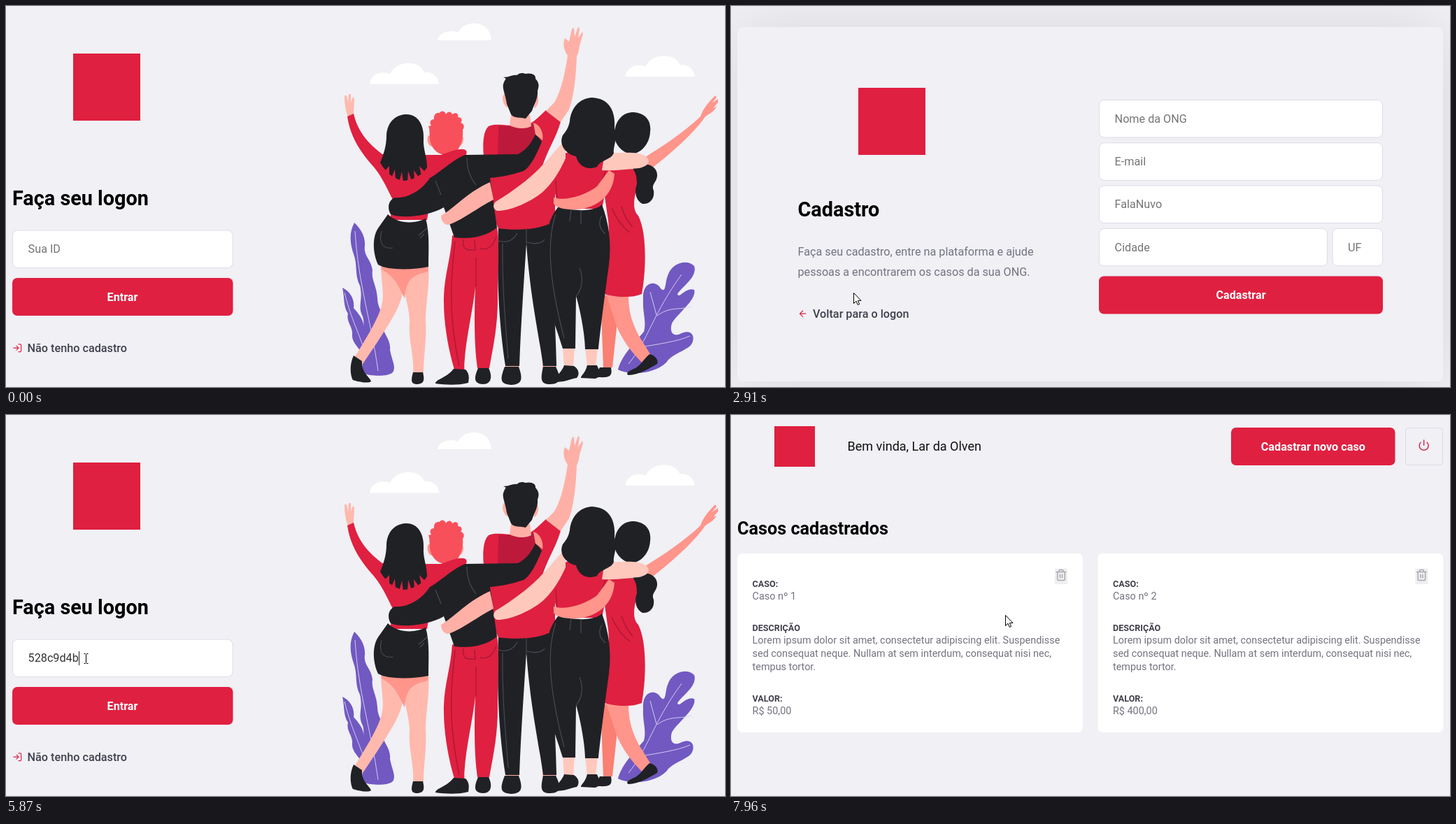
An HTML page for the animation above (8 s loop, 1028x545 px).

```html
<!DOCTYPE html>
<html lang="pt-BR">
<head>
<meta charset="utf-8">
<title>Logon</title>
<style>
html, body { margin: 0; width: 100%; height: 100%; overflow: hidden; background: #f0f0f5; }
svg { display: block; width: 100vw; height: 100vh; }
text { font: 400 16.2px Roboto, sans-serif; fill: #737380; }
.title { font-weight: 700; font-size: 28.8px; fill: #000; }
.link { font-weight: 500; fill: #41414d; }
.label { font-weight: 700; fill: #fff; text-anchor: middle; }
.hint { fill: #757575; }
.small { font-size: 14.4px; }
.tag { font-size: 12.6px; font-weight: 700; fill: #41414d; }
.box { fill: #fff; stroke: #dcdce6; }
.icon { fill: none; stroke: #e02041; stroke-width: 2; stroke-linecap: round; stroke-linejoin: round; }
.r { fill: #df2040; } .k { fill: #202125; } .s { fill: #ffb9ad; } .p { fill: #ff958b; }
.t { fill: #ffb0a6; } .l { fill: #ffc8bd; } .v { fill: #7159c1; } .w { fill: #fff; } .d { fill: #bd193b; }
.line { fill: none; stroke: #a81738; stroke-width: 1.3; }
.seam { fill: none; stroke: #4c4d54; stroke-width: 1.1; }
.vein { fill: none; stroke: #ded6f5; stroke-width: .9; }
.cursor path { fill: #fff; stroke: #000; stroke-linejoin: round; }
</style>
</head>
<body>
<svg viewBox="0 0 1028 545" preserveAspectRatio="none">
<defs>
  <path id="cloud" d="M520 111.500C521 98 536 92 549 97C558 77 592 77 598 95C610 93 619 102 619 111.500Z"/>
  <g id="case">
    <rect x="9" y="198" width="494" height="256" rx="7" fill="#fff"/>
    <rect x="463" y="219.5" width="18" height="22.5" fill="#efefef"/>
    <g class="icon" style="stroke:#a8a8b3" transform="translate(463 220) scale(.75)">
      <path d="M3 6H21M19 6v14a2 2 0 0 1-2 2H7a2 2 0 0 1-2-2V6m3 0V4a2 2 0 0 1 2-2h4a2 2 0 0 1 2 2v2M10 11v6M14 11v6"/>
    </g>
    <text class="tag" x="30.6" y="246">CASO:</text>
    <text class="tag" x="30.6" y="309">DESCRIÇÃO</text>
    <text class="tag" x="30.6" y="410">VALOR:</text>
    <text class="small" x="30.6" y="327">Lorem ipsum dolor sit amet, consectetur adipiscing elit. Suspendisse</text>
    <text class="small" x="30.6" y="346">sed consequat neque. Nullam at sem interdum, consequat nisi nec,</text>
    <text class="small" x="30.6" y="365">tempus tortor.</text>
  </g>
</defs>

<g id="logon">
  <rect class="r" x="96" y="68" width="96" height="96"/>
  <text class="title" x="9" y="285">Faça seu logon</text>
  <rect class="box" x="9.5" y="321" width="314.5" height="53.5" rx="7"/>
  <text id="hint" class="hint" x="31.6" y="353">Sua ID</text>
  <text id="value" x="31.6" y="353" style="fill:#333">528c9d4b</text>
  <rect id="caret" y="338" width="1" height="20" fill="#222"/>
  <g id="enter">
    <rect x="9" y="389" width="315.5" height="54" rx="7" fill="#e02041"/>
    <text class="label" x="166.5" y="421.5">Entrar</text>
  </g>
  <g id="signup">
    <path class="icon" transform="translate(9 482) scale(.6)" d="M15 3h4a2 2 0 0 1 2 2v14a2 2 0 0 1-2 2h-4M10 17l5-5-5-5M15 12H3"/>
    <text class="link" x="30.6" y="494.5">Não tenho cadastro</text>
  </g>

  <g id="clouds" class="w">
    <use href="#cloud"/><use href="#cloud" x="365.5" y="-10.5"/>
    <path d="M616.500 49C619 38 634 33 646 38C656 18 693 20 694 49Z"/>
  </g>
  <g id="leaves">
    <path class="v" d="M498 310C507 318 514 330 513 343C511 358 522 362 524 378C522 392 530 400 531 418C531 432 540 438 538 452C537 468 551 476 549 492C552 508 558 516 553 524C546 531 520 529 512 526C505 516 514 505 511 492C504 470 515 462 510 444C502 430 511 420 506 400C498 385 503 370 497 355C492 340 490 325 498 310Z"/>
    <path class="v" d="M481 403C492 408 499 420 497 432C504 440 513 450 511 462C520 470 524 480 520 496L512 502C505 488 494 482 495 470C496 458 486 452 489 440C482 430 484 415 481 403Z"/>
    <path class="v" d="M875 520C880 500 900 480 912 466C916 450 910 440 911 420C909 393 930 392 936 404C944 412 942 396 946 386C952 366 975 362 984 372C989 388 966 402 960 412C962 420 972 401 984 406C988 420 960 440 952 454C948 468 955 474 966 468C986 460 986 482 976 488C964 496 950 500 944 510C925 528 890 528 875 520Z"/>
    <path class="vein" d="M499 322C504 400 522 450 532 522M484 410C494 450 506 470 514 498M890 512C918 478 925 440 966 384M930 442L921 409M931 443C948 430 962 435 981 430M908 488C930 484 960 480 978 472"/>
  </g>

  <g id="right-woman">
    <path d="M850 413L878 415L867 517L854 517Z" fill="#f98073"/>
    <path class="p" d="M858 412H890C890 438 895 452 905 472L923 501L912 513C895 496 880 477 872 455Z"/>
    <path class="k" d="M920 498C930 500 933 508 931 512C920 518 905 528 890 528C885 526 890 522 900 518C908 513 912 505 920 498ZM849 517H865C867 528 865 532 848 531L832 530C833 526 846 524 849 517Z"/>
    <path class="p" d="M914 216C940 200 970 180 993 158C996 148 1004 138 1014 128L1016 131L1009 139L1018 133L1018 138L1011 146L1016 144C1012 151 1006 154 1000 158C985 180 955 208 916 238Z"/>
    <path class="r" d="M850 230L906 234C905 260 890 285 904 300C917 325 915 380 909 412C890 420 860 415 844 408C855 380 866 330 860 300Z"/>
    <path class="k" d="M897 152C915 153 923 165 921 180C920 200 905 212 893 212C878 208 868 195 870 180C872 162 883 152 897 152ZM892 228C915 222 932 228 931 243C930 253 922 255 926 264C928 278 918 284 910 283C900 278 898 265 902 255C902 242 900 236 892 228Z"/>
    <path class="line" d="M866 289C872 303 880 315 892 324M880 287C884 300 890 310 896 316"/>
  </g>

  <g id="tall-man">
    <path class="t" d="M715 508H733V522H715ZM767 508H787V522H767Z"/>
    <path class="k" d="M704 316L776 310C780 380 786 450 787 515H768C762 470 750 420 744 340C740 400 736 460 734 515H714C706 460 701 400 704 316Z"/>
    <path class="k" d="M713 516H733C740 535 737 541 722 542C706 541 706 534 713 516ZM768 516H786C795 534 792 541 778 541C764 541 764 534 768 516Z"/>
    <path class="r" d="M690 172C700 167 720 172 737 172C748 172 755 165 772 149L793 166C785 192 774 206 766 232L785 236V300L776 312C755 321 725 321 704 318C694 300 690 260 690 245L683 215C681 195 683 178 690 172Z"/>
    <path class="d" d="M704 172L756 169L768 186L742 213L703 216Z"/>
    <path class="t" d="M772 150L784 138C795 120 800 90 803 71C797 62 796 54 799 46L805 51L809 33L812 31L813 44L818 30L820 32L818 46L824 37L825 40L820 57C819 65 818 68 816 72C815 100 812 130 805 148L793 166ZM722 156H749L751 172C742 177 728 175 720 171ZM712 126C707 132 713 146 718 145V128ZM757 126C765 130 760 146 755 146Z"/>
    <path class="k" d="M716 140C714 125 708 116 712 109C714 104 717 104 711 102C720 102 724 98 731 99C732 96 740 95 742 97C751 95 758 98 757 104C763 110 762 116 760 121C761 133 755 140 752 150L743 161C736 159 726 161 722 155Z"/>
    <path class="seam" d="M704 336C718 340 726 334 731 325M745 338C760 342 771 338 776 326M744 320V340M710 340C709 400 714 450 718 505"/>
  </g>

  <g id="red-hair">
    <path class="s" d="M641 515H656V525H641ZM674 514H691V524H674Z"/>
    <path class="r" d="M638 328C660 333 685 330 702 316C706 340 703 380 703 420C703 460 696 490 691 518H674C670 490 669 450 671 402C667 440 656 480 655 520H641C632 490 625 450 626 415C627 385 636 360 638 328Z"/>
    <path class="line" d="M654 334C652 348 658 350 671 349L670 335M678 347C690 350 697 342 701 330M642 336C636 390 632 440 648 515M672 402V360"/>
    <path class="k" d="M640 519L657 520C663 526 662 533 661 539C646 543 628 542 614 540C614 534 630 532 640 519ZM675 518H690C696 530 694 541 682 541C670 540 668 534 675 518Z"/>
    <path class="p" d="M604 185C600 192 605 202 610 201L612 187ZM651 185C657 188 653 201 647 201Z"/>
    <path d="M608 198C604 188 607 178 604 172L608 171C605 166 607 162 612 162C611 156 615 152 620 153C622 149 628 150 629 155C632 150 637 151 638 155C643 151 648 154 646 159C652 159 653 164 650 167C655 168 656 173 653 177C654 186 652 195 647 204C640 216 616 218 608 198Z" fill="#f8505b"/>
  </g>

  <g id="left-woman">
    <path class="s" d="M489 159C485 148 484 138 484 128L487 128L489 138L490 126L493 126L493 138L496 130L498 132C498 142 497 148 497 156Z"/>
    <path class="s" d="M536 372L570 374C570 405 566 422 556 440C545 460 525 490 510 512L498 503C512 480 528 455 535 435C543 415 536 395 536 372ZM565 374L604 370C606 400 600 425 600 450C602 480 596 505 597 526H582C584 500 575 480 577 450C576 425 566 405 565 374Z"/>
    <path class="p" d="M537 372H604L603 380C590 384 572 384 570 418C562 404 558 388 537 377Z"/>
    <path class="k" d="M497 500C490 515 493 530 496 535C505 538 518 540 522 537C520 530 508 525 509 508ZM582 524C578 538 580 541 589 541C597 540 599 536 596 524Z"/>
    <path class="r" d="M488 158L497 154C502 175 512 192 538 212L600 213L622 213C640 206 654 202 658 207C662 214 646 226 632 236L610 256L602 306L548 306L556 282C548 270 540 245 522 226C504 205 492 185 488 158Z"/>
    <path class="k" d="M546 298C560 312 585 312 600 304C606 325 604 350 604 373C580 378 545 378 532 370C525 355 522 330 534 315Z"/>
    <path class="seam" d="M537 322C532 340 540 348 553 346M590 328L602 318M592 332L598 326"/>
    <path class="k" d="M571 155C590 154 598 172 597 190C596 205 602 215 602 231C594 243 582 249 568 250C556 248 544 240 535 224C540 212 544 200 544 185C545 168 555 156 571 155Z"/>
    <path class="r" d="M541 236L548 229L548 245ZM551 246L556 234L557 249ZM562 252L566 237L568 252ZM574 252L575 236L580 250ZM584 249L583 235L591 246ZM594 243L591 229L600 238Z"/>
  </g>

  <g id="embrace">
    <path class="k" d="M656 213L732 212C745 205 752 195 757 183L766 194C758 215 748 232 740 236C722 242 705 245 692 246L702 317C685 331 660 334 641 331L626 288C606 300 568 305 550 298C545 290 546 278 556 274C575 276 596 262 606 246C618 240 636 222 656 213Z"/>
    <path class="p" d="M754 167C764 170 769 182 767 192L757 184Z"/>
    <path class="seam" d="M659 217C659 235 664 246 672 256M614 250L622 270"/>
    <path class="t" d="M622 300C640 290 660 266 692 252L697 277C675 288 650 308 632 313C625 312 622 306 622 300Z"/>
  </g>

  <g id="middle-woman">
    <path class="l" d="M796 488H813L811 517H798ZM828 488H846L843 517H831Z"/>
    <path class="r" d="M788 215L815 205L865 207L862 240L852 290L790 290L782 255Z"/>
    <path class="line" d="M858 234L852 250M786 250L788 275"/>
    <path class="k" d="M790 287C820 296 845 292 852 284C862 310 866 340 862 370C858 400 850 460 847 491H828C828 470 820 430 815 415L814 490H796C784 450 762 400 768 360C768 330 778 300 790 287Z"/>
    <path class="seam" d="M786 298C775 330 773 380 798 475M808 290L806 308M822 292V312M852 300C846 310 848 318 857 326M815 415C824 405 826 390 820 375"/>
    <path class="k" d="M798 514L812 515C820 520 820 528 816 532C805 534 800 538 784 538C780 534 794 526 798 514ZM831 514H845C850 524 850 532 842 533L822 532C822 528 828 526 831 514Z"/>
    <path class="l" d="M800 192C790 200 780 215 760 235C745 250 720 268 700 280C695 285 697 292 703 293C720 293 745 283 765 268C780 255 790 240 800 218ZM856 210C875 212 900 206 915 215C922 222 920 228 905 232C885 234 865 236 852 235Z"/>
    <path class="p" d="M783 274C800 280 830 270 845 258L862 235L870 240C868 270 848 285 825 290C805 293 788 290 783 283Z"/>
    <path class="k" d="M838 131C862 132 872 150 870 175C875 190 868 200 869 210C866 220 850 220 845 230C830 236 818 228 815 215C800 212 790 198 796 185C800 180 804 175 806 165C808 145 820 132 838 131Z"/>
  </g>
</g>

<g id="register">
  <rect x="9" y="30" width="1009" height="507" fill="#000" opacity=".1" style="filter:blur(45px)"/>
  <rect x="9" y="30" width="1009" height="507" rx="7" fill="#f0f0f5"/>
  <rect class="r" x="182" y="117" width="96" height="96"/>
  <text class="title" x="95.5" y="301">Cadastro</text>
  <text x="95.5" y="356.8">Faça seu cadastro, entre na plataforma e ajude</text>
  <text x="95.5" y="385.6">pessoas a encontrarem os casos da sua ONG.</text>
  <g id="back">
    <path class="icon" transform="translate(95.4 433) scale(.6)" d="M19 12H5M12 19l-7-7 7-7"/>
    <text class="link" x="117" y="446">Voltar para o logon</text>
  </g>
  <rect class="box" x="526.5" y="134.5" width="405" height="53.5" rx="7"/>
  <rect class="box" x="526.5" y="195.8" width="405" height="53.5" rx="7"/>
  <rect class="box" x="526.5" y="257" width="405" height="53.5" rx="7"/>
  <rect class="box" x="526.5" y="318.3" width="326" height="53.5" rx="7"/>
  <rect class="box" x="860" y="318.3" width="71.5" height="53.5" rx="7"/>
  <text class="hint" x="548.6" y="167">Nome da ONG</text>
  <text class="hint" x="548.6" y="228">E-mail</text>
  <text class="hint" x="548.6" y="289.3">FalaNuvo</text>
  <text class="hint" x="548.6" y="350.5">Cidade</text>
  <text class="hint" x="882" y="350.5">UF</text>
  <rect x="526" y="386.5" width="406" height="54" rx="7" fill="#e02041"/>
  <text class="label" x="729" y="419">Cadastrar</text>
</g>

<g id="profile">
  <rect class="r" x="62" y="16" width="58" height="58"/>
  <text x="166.6" y="51" style="font-size:18px;fill:#111">Bem vinda, Lar da Olven</text>
  <rect x="715" y="18" width="234.5" height="54" rx="7" fill="#e02041"/>
  <text class="label" x="832.3" y="50.5">Cadastrar novo caso</text>
  <rect class="box" x="964.5" y="18.5" width="53" height="53" rx="4" style="fill:none"/>
  <path class="icon" transform="translate(982 34.5) scale(.72)" d="M18.36 6.64a9 9 0 1 1-12.73 0M12 2v10"/>
  <text class="title" x="9" y="170.5" style="font-size:25.2px">Casos cadastrados</text>
  <g id="cases">
    <use href="#case"/>
    <text class="small" x="30.6" y="264">Caso nº 1</text>
    <text class="small" x="30.6" y="428">R$ 50,00</text>
    <use href="#case" x="515.4"/>
    <text class="small" x="546" y="264">Caso nº 2</text>
    <text class="small" x="546" y="428">R$ 400,00</text>
  </g>
</g>

<g id="pointer" class="cursor">
  <circle id="click" cx="-.5" cy="-.7" r="10.6" fill="#ff0" opacity=".53"/>
  <path id="arrow" d="M.5.5V15.5L4 12.2 6.3 17.5 8.6 16.5 6.3 11.4H11Z"/>
  <path id="hand" d="M-2 2C-2-.5 1.5-.5 1.5 2V8C2 6.5 4.5 6.5 4.8 8.5 5.3 7.3 7.5 7.5 7.7 9.3 8.5 8.5 10 9 10 10.5V14C10 17 8 18 8 20.5H0C0 18-3 16.5-5.5 12.5-6.5 10.5-4.5 9.5-2 12ZM1.5 8V11.5M4.8 8.5V12M7.7 9.3V12.5"/>
  <path id="beam" transform="translate(.5 .5)" d="M-3-7H-1L0-6 1-7H3M0-6V6M-3 7H-1L0 6 1 7H3" style="fill:none"/>
</g>
</svg>

<script>
const LOOP = 8000;
const el = id => document.getElementById(id);
const show = (id, on) => { el(id).style.display = on ? '' : 'none'; };
const within = (t, a, b) => t >= a && t < b;

// Each move: start, end, number of steps, target, optional bend point.
const start = [870, 520];
const moves = [
  { from: 210, to: 670, steps: 7, at: [635, 453] },
  { from: 980, to: 1740, steps: 11, at: [124, 487], bend: [380, 385] },
  { from: 2040, to: 2820, steps: 11, at: [172, 408] },
  { from: 2910, to: 3620, steps: 10, at: [202, 432] },
  { from: 3720, to: 3860, steps: 3, at: [203, 439] },
  { from: 4180, to: 4870, steps: 10, at: [120, 362] },
  { from: 4950, to: 5260, steps: 5, at: [114, 348] },
  { from: 6100, to: 6490, steps: 6, at: [141, 414] },
  { from: 7270, to: 7650, steps: 6, at: [298, 305] },
  { from: 7880, to: 7960, steps: 2, at: [392, 286] }
];
const clicks = [[1890, 2040], [4090, 4180], [5190, 5260], [6870, 7270]];
const zones = [
  { id: 'field', page: 'logon', box: [9, 321, 324, 375] },
  { id: 'enter', page: 'logon', box: [9, 389, 324, 443] },
  { id: 'signup', page: 'logon', box: [9, 480, 173, 499] },
  { id: 'back', page: 'register', box: [95, 431, 255, 449] }
];

function pageAt(t) {
  return t >= 7270 ? 'profile' : within(t, 2040, 4180) ? 'register' : 'logon';
}

function positionAt(t) {
  let pos = start;
  for (const m of moves) {
    if (t < m.from) break;
    const step = Math.floor((t - m.from) / (m.to - m.from) * (m.steps - 1) + 1e-6);
    const p = Math.min(1, (step + 1) / m.steps);
    const q = 1 - p;
    pos = pos.map((a, i) => {
      const bend = m.bend ? m.bend[i] : (a + m.at[i]) / 2;
      return q * q * a + 2 * p * q * bend + p * p * m.at[i];
    });
  }
  return pos;
}

function hoverAt(t) {
  const [x, y] = positionAt(t);
  const page = pageAt(t);
  const zone = t >= 210 && zones.find(({ page: on, box: [l, top, r, b] }) =>
    on === page && x >= l && x <= r && y >= top && y <= b);
  return zone ? zone.id : '';
}

// Share of the last 200 ms spent over a zone: a linear hover transition.
function hoverAmount(id, t) {
  let sum = 0;
  for (let i = 0; i < 10; i++) sum += hoverAt(t - i * 20) === id;
  return sum / 10;
}

function draw(t) {
  const page = pageAt(t);
  for (const id of ['logon', 'register', 'profile']) show(id, id === page);
  show('cases', t >= 7340);

  const filled = t >= 5730;
  show('hint', !filled);
  show('value', filled);
  show('caret', within(t, 5190, 5690) || within(t, 5730, 6240));
  el('caret').setAttribute('x', filled ? 104 : 31);

  el('enter').style.filter = `brightness(${1 - .1 * hoverAmount('enter', t)})`;
  for (const id of ['signup', 'back']) el(id).style.opacity = 1 - .2 * hoverAmount(id, t);

  const zone = hoverAt(t);
  const [x, y] = positionAt(t).map(Math.round);
  show('pointer', t >= 210);
  show('beam', zone === 'field');
  show('hand', zone && zone !== 'field');
  show('arrow', !zone);
  show('click', clicks.some(([a, b]) => within(t, a, b)));
  el('pointer').setAttribute('transform', `translate(${x} ${y})`);
}

const origin = performance.now();
function tick() {
  draw((performance.now() - origin) % LOOP);
  requestAnimationFrame(tick);
}
tick();
</script>
</body>
</html>
```
